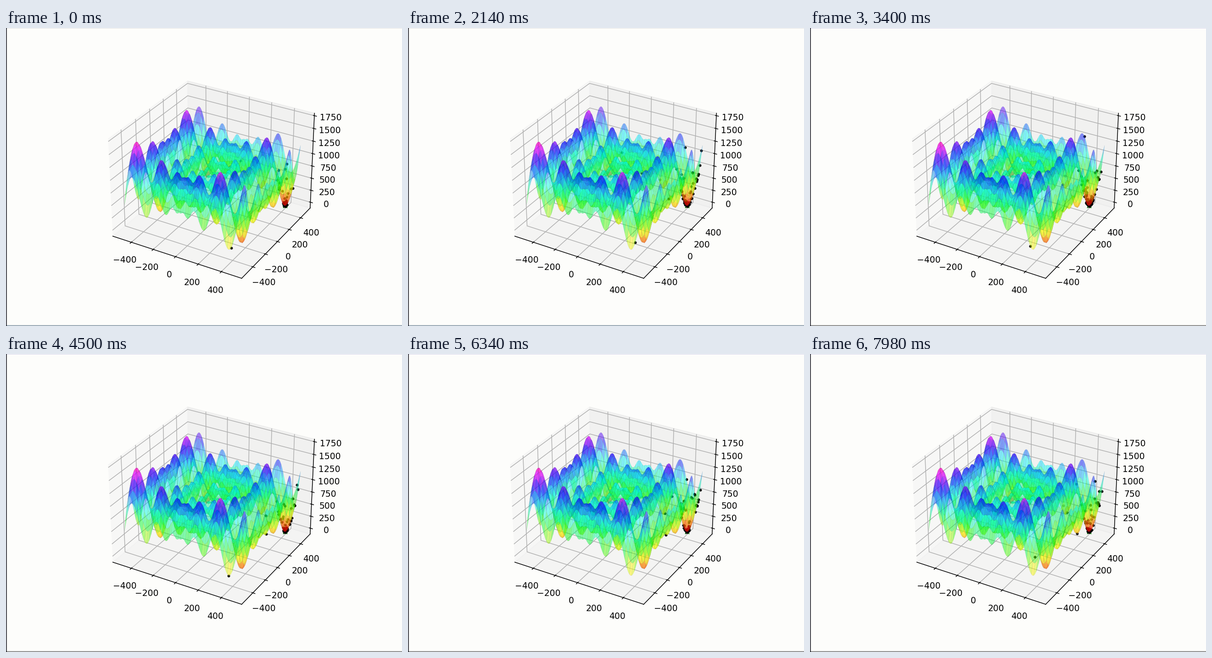
A matplotlib script that plays this animation: 863x649 px, repeating every 8000 ms.

```python
import numpy as np
import matplotlib.pyplot as plt
from matplotlib.animation import FuncAnimation
from mpl_toolkits.mplot3d import proj3d

W, H, DPI = 863, 649, 135
LOOP, INTERVAL = 8000, 40
PX = 72 / DPI
PAPER = "#fdfdfb"
BEST = 420.9687
SWARM = 100

# Bursts of generations: start ms, end ms, number of generations
BURSTS = [(20, 80, 2), (320, 1120, 17), (1140, 1860, 17)]
BURSTS += [(1960 + 840 * k, 2700 + 840 * k, 18) for k in range(7)]
BURSTS += [(7840, 7980, 4)]
CHANGES = np.concatenate([np.linspace(*burst) for burst in BURSTS])


def schwefel(x, y):
    return 837.9658 - x * np.sin(np.sqrt(abs(x))) - y * np.sin(np.sqrt(abs(y)))


def grab(fig):
    fig.canvas.draw()
    return np.array(fig.canvas.buffer_rgba())


def build_space(fig):
    ax = fig.add_axes([195 / W, 72.3 / H, 500 / W, 500 / H], projection="3d")
    ax.set_facecolor("none")
    ax.set_xlim(-572.9, 572.9)
    ax.set_ylim(-572.9, 572.9)
    ax.set_zlim(-122.2, 1798.2)
    ax.set_xticks(range(-400, 401, 200))
    ax.set_yticks(range(-400, 401, 200))
    ax.set_zticks(range(0, 1751, 250))
    ax.view_init(elev=30, azim=-60)
    return ax


def add_surface(ax):
    side = np.linspace(-500, 500, 100)
    x, y = np.meshgrid(side, side)
    ax.plot_surface(x, y, schwefel(x, y), cmap="gist_rainbow", alpha=0.47,
                    edgecolor="black", linewidth=0.05, antialiased=True)


def swarm(generation):
    """Individuals around the optimum with heavy tails along each axis."""
    rng = np.random.default_rng(500 + generation)
    spread = 10 ** rng.uniform(-0.2, 1.65, (SWARM, 1))
    pos = BEST + spread * rng.standard_cauchy((SWARM, 2))
    return np.clip(pos, -500, 500).T


fig = plt.figure(figsize=((W + 0.01) / DPI, (H + 0.01) / DPI), dpi=DPI,
                 facecolor=PAPER)

# The axes and the translucent surface never change: render each only once
space = build_space(fig)
backdrop = grab(fig)
view = space.get_proj()
to_pixels = space.transData.frozen()
space.set_axis_off()
add_surface(space)
fig.set_facecolor("none")
veil = grab(fig)
space.remove()
fig.set_facecolor(PAPER)


def project(x, y):
    px, py, _ = proj3d.proj_transform(x, y, schwefel(x, y), view)
    return to_pixels.transform(np.column_stack([px, py]))


rows = np.flatnonzero(veil[..., 3].any(axis=1))
cols = np.flatnonzero(veil[..., 3].any(axis=0))
top, bottom, left, right = rows[0], rows[-1] + 1, cols[0], cols[-1] + 1
fig.figimage(backdrop, 0, 0, origin="upper", zorder=-1)
fig.figimage(veil[top:bottom, left:right], left, veil.shape[0] - bottom,
             origin="upper", zorder=2)

stage = fig.add_axes([0, 0, 1, 1], zorder=1)
stage.axis("off")
stage.set_xlim(0, W)
stage.set_ylim(0, H)
goal = project(np.array([BEST]), np.array([BEST]))
stage.scatter(*goal.T, marker="x", s=22, color="green", linewidths=1.2)
dots = stage.scatter([], [], s=5, color="black", alpha=0.85, linewidths=1)
top_rule, = stage.plot([0, W], [H - 0.5, H - 0.5], lw=PX)
base_rule, = stage.plot([0, W], [0.75, 0.75], lw=1.5 * PX)
stage.plot([0.75, 0.75], [0, H], color="#14141e", lw=1.5 * PX)


def update(frame):
    ms = frame * INTERVAL
    generation = int(np.searchsorted(CHANGES, ms, side="right"))
    dots.set_offsets(project(*swarm(generation)))
    early = ms < 2800
    top_rule.set_color("#e3e3e3" if early else "#d9d7ee")
    base_rule.set_color("#7d8fa0" if early else "#6e6e6e")
    return dots, top_rule, base_rule


anim = FuncAnimation(fig, update, frames=LOOP // INTERVAL, interval=INTERVAL,
                     repeat=True, repeat_delay=0, blit=False)
plt.show()
```
